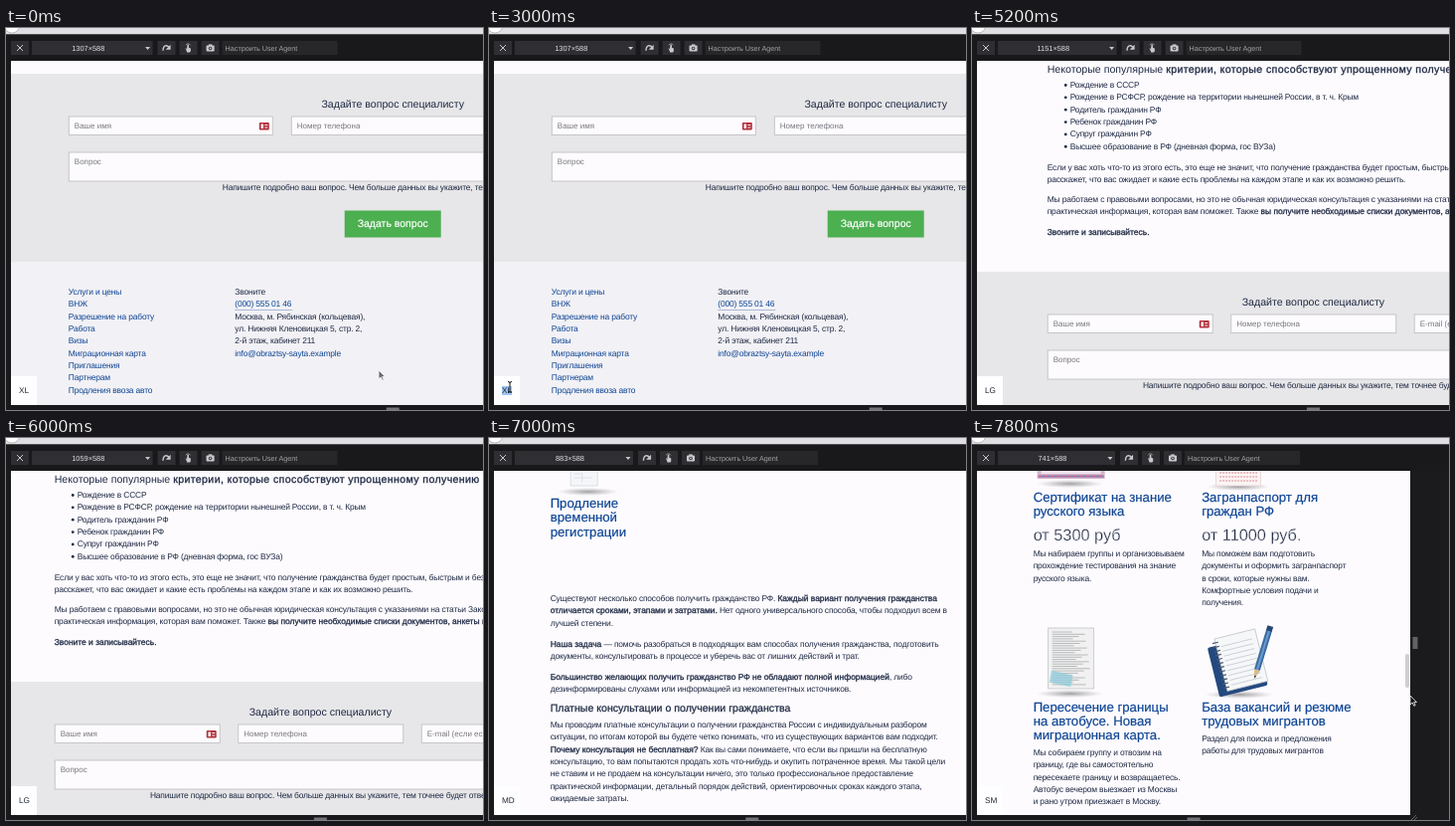
Animation, 480 px wide and 384 px high, one loop 8 s. Source, as an HTML page:

```html
<!DOCTYPE html>
<html lang="ru">
<head>
<meta charset="utf-8">
<title>Адаптивная страница</title>
<style>
  html, body { margin: 0; width: 100%; height: 100%; overflow: hidden; background: #18181b; }
  svg { display: block; width: 100vw; height: 100vh; }
  text { font-family: "Liberation Sans", Arial, sans-serif; text-rendering: geometricPrecision; white-space: pre; }
  .b { stroke: #1f2a44; stroke-width: .3px; letter-spacing: .035em; }
  .body { letter-spacing: -.02em; }
  .body .b { letter-spacing: 0; }
</style>
</head>
<body>
<svg id="stage" viewBox="0 0 480 384"></svg>
<script>
const LOOP = 8000, STEP = 200, SCALE = .587, LINE = 12.35, BODY = 8.45;
const INK = '#1f2a44', LINK = '#0e4594', PAGE = '#fdfbfe', DARK = '#19191c', HINT = '#77777d';

const rect = (x, y, w, h, fill, extra = '') =>
  `<rect x="${x}" y="${y}" width="${w}" height="${h}" fill="${fill}" ${extra}/>`;
const path = (d, stroke, width = 1, fill = 'none', extra = '') =>
  `<path d="${d}" stroke="${stroke}" stroke-width="${width}" fill="${fill}" ${extra}/>`;
const group = (x, y, content, extra = '') =>
  `<g transform="translate(${x} ${y}) ${extra}">${content}</g>`;
const shadow = (x, y, rx) =>
  `<ellipse cx="${x}" cy="${y}" rx="${rx}" ry="4" fill="url(#shade)"/>`;
const outline = (color, width) => `stroke="${color}" stroke-width="${width}"`;

// *Asterisks* mark emphasised words.
const text = (x, y, s, size = BODY, fill = INK, extra = '') =>
  `<text x="${x}" y="${y}" font-size="${size}" fill="${fill}" class="${size === BODY ? 'body' : ''}" ${extra}>${
    s.replace(/\*(.+?)\*/g, '<tspan class="b">$1</tspan>')}</text>`;
const lines = (x, y, rows, fill = INK) => rows.map((s, i) => text(x, y + i * LINE, s, BODY, fill)).join('');
const title = (x, y, rows) =>
  rows.map((s, i) => text(x, y + i * 14.3, s, 13.2, LINK, outline(LINK, .2))).join('');
// An outline in the page colour thins the strokes of the large prices.
const price = (x, y, s) => text(x, y, s, 16.3, INK, outline(PAGE, .3));

// Linear interpolation through [time, value] keys.
function track(keys, t) {
  if (t <= keys[0][0]) return keys[0][1];
  for (let i = 1; i < keys.length; i++) {
    const [t0, a] = keys[i - 1], [t1, b] = keys[i];
    if (t <= t1) return a + (b - a) * (t - t0) / (t1 - t0);
  }
  return keys[keys.length - 1][1];
}

const WIDTH = [[4000, 1307], [4400, 1304], [5200, 1151], [6000, 1059], [7000, 883], [7800, 741]];
const MOUSE_X = [[0, 375], [400, 330], [1000, 110], [1400, 21], [3200, 21], [3400, 60], [3600, 135]];
const MOUSE_Y = [[0, 344], [1000, 352], [1400, 361], [3200, 361], [3600, 352]];

const LAYOUTS = [
  { name: 'XL', min: 1200, container: 1140, draw: drawXL },
  { name: 'LG', min: 992, container: 940, draw: drawLG },
  { name: 'MD', min: 768, container: 720, draw: drawMD },
  { name: 'SM', min: 0, container: 578, draw: drawSM }
];

function field(x, y, w, h, label) {
  return rect(x + .5, y + .5, w - 1, h - 1, PAGE, 'stroke="#c6c5c9"') + text(x + 6, y + 12, label, 8, HINT);
}

function form(left, center, top, fieldWidth, pitch, height) {
  const labels = ['Ваше имя', 'Номер телефона', 'E-mail (если есть)'];
  const icon = left + fieldWidth - 14;
  return rect(0, top, 480, height, '#e7e6e8') +
    text(center, top + 33.5, 'Задайте вопрос специалисту', 10.6, INK, 'text-anchor="middle"') +
    labels.map((s, i) => field(left + i * pitch, top + 42.5, fieldWidth, 19.5, s)).join('') +
    rect(icon, top + 49, 10, 7.5, '#b3303d', 'rx="1"') +
    rect(icon + 1.8, top + 50.5, 2.4, 4.5, '#fff') +
    path(`M${icon + 5.5} ${top + 51.5}h3m-3 2.5h3`, '#fff', .9) +
    field(left, top + 78.5, 660, 30, 'Вопрос') +
    text(center - 171.5, top + 117, 'Напишите подробно ваш вопрос. Чем больше данных вы укажите, тем точнее будет ответ');
}

function drawXL(left, center) {
  const right = left + 167.5;
  return form(left, center, 46, 206, 224, 189) +
    rect(center - 48.5, 183.5, 97, 27, '#4caf50') +
    text(center, 200, 'Задать вопрос', 10.5, '#fff', 'text-anchor="middle" ' + outline('#fff', .2)) +
    rect(0, 235, 480, 145, '#f2f1f5') +
    lines(left, 268, ['Услуги и цены', 'ВНЖ', 'Разрешение на работу', 'Работа', 'Визы',
      'Миграционная карта', 'Приглашения', 'Партнерам', 'Продления ввоза авто'], LINK) +
    text(right, 268, 'Звоните') +
    text(right, 268 + LINE, '(000) 555 01 46', BODY, LINK) +
    path(`M${right} 283.5h58`, '#8ba3c8', .7) +
    lines(right, 268 + 2 * LINE, ['Москва, м. Рябинская (кольцевая),',
      'ул. Нижняя Кленовицкая 5, стр. 2,', '2-й этаж, кабинет 211']) +
    text(right, 268 + 5 * LINE, 'info@obraztsy-sayta.example', BODY, LINK);
}

function drawLG(left, center) {
  const criteria = ['Рождение в СССР', 'Рождение в РСФСР, рождение на территории нынешней России, в т. ч. Крым',
    'Родитель гражданин РФ', 'Ребенок гражданин РФ', 'Супруг гражданин РФ',
    'Высшее образование в РФ (дневная форма, гос ВУЗа)'];
  return text(left, 44.5, 'Некоторые популярные *критерии, которые способствуют упрощенному получению гражданства*', 10.6) +
    lines(left + 23, 60, criteria) +
    criteria.map((_, i) => `<circle cx="${left + 18.5}" cy="${57.5 + i * LINE}" r="1.4" fill="${INK}"/>`).join('') +
    lines(left, 142.5, [
      'Если у вас хоть что-то из этого есть, это еще не значит, что получение гражданства будет простым, быстрым и без проблем.',
      'расскажет, что вас ожидает и какие есть проблемы на каждом этапе и как их возможно решить.']) +
    lines(left, 174.5, [
      'Мы работаем с правовыми вопросами, но это не обычная юридическая консультация с указаниями на статьи Законов,',
      'практическая информация, которая вам поможет. Также *вы получите необходимые списки документов, анкеты и бланки*']) +
    text(left, 208, '*Звоните и записывайтесь.*') +
    form(left, center, 245, 167, 184.5, 135);
}

function drawMD(left) {
  return shadow(left + 38, 54, 31) +
    rect(left + 20.5, 25, 27, 23, '#f5f6f9', 'stroke="#dcdfe5"') +
    path(`M${left + 24} 36h9m-9 4h18m-10-4v8`, '#d3dae5', .8) +
    title(left, 70, ['Продление', 'временной', 'регистрации']) +
    lines(left, 164, ['Существуют несколько способов получить гражданство РФ. *Каждый вариант получения гражданства*',
      '*отличается сроками, этапами и затратами.* Нет одного универсального способа, чтобы подходил всем в',
      'лучшей степени.']) +
    lines(left, 209.5, ['*Наша задача* — помочь разобраться в подходящих вам способах получения гражданства, подготовить',
      'документы, консультировать в процессе и уберечь вас от лишних действий и трат.']) +
    lines(left, 242.5, ['*Большинство желающих получить гражданство РФ не обладают полной информацией*, либо',
      'дезинформированы слухами или информацией из некомпетентных источников.']) +
    text(left, 275, 'Платные консультации о получении гражданства', 10.6, INK, outline(INK, .25)) +
    lines(left, 291, ['Мы проводим платные консультации о получении гражданства России с индивидуальным разбором',
      'ситуации, по итогам которой вы будете четко понимать, что из существующих вариантов вам подходит.',
      '*Почему консультация не бесплатная?* Как вы сами понимаете, что если вы пришли на бесплатную',
      'консультацию, то вам попытаются продать хоть что-нибудь и окупить потраченное время. Мы такой цели',
      'не ставим и не продаем на консультации ничего, это только профессиональное предоставление',
      'практической информации, детальный порядок действий, ориентировочных сроках каждого этапа,',
      'ожидаемые затраты.']);
}

function notebook() {
  const rules = Array.from({ length: 9 }, (_, i) => `M13 ${9 + i * 5}h32`).join('');
  const rings = Array.from({ length: 12 }, (_, i) => `M5 ${4 + i * 4.2}h6`).join('');
  const pad = rect(-1, 7, 50, 51, '#23497f', 'rx="2"') +
    rect(8, 0, 42, 54, '#f6f7f8', outline('#b9c0ca', .7)) +
    path(rules, '#bfc4cd', .7) + path(rings, '#4a586d', 1.2);
  const pencil = rect(-3, 0, 6, 42, '#3a6ca5') + rect(-1, 0, 2, 42, '#6d9bca') +
    rect(-3, -4, 6, 5, '#27466f') + path('M-3 42h6l-3 9z', 'none', 0, '#d9b98a') + path('M-1 48h2l-1 3z', 'none', 0, '#333');
  return group(1, 14, pad, 'rotate(-14)') + group(64, 3, pencil, 'rotate(17)');
}

function drawSM(left) {
  const right = left + 169.5;
  const sheet = Array.from({ length: 24 }, (_, i) => `M4 ${4 + i * 2.3}h${20 + i * 13 % 19}`).join('');
  return shadow(left + 37, 46, 34) +
    rect(left + 4, 28, 68, 13, '#d9b3cb') + rect(left + 8, 28, 60, 8, '#f0e4ee') +
    path(`M${left + 5} 38.5h66`, '#7d7ab4', 2.2) +
    path(`M${left + 5} 38.5h66`, '#d66b85', 1.5, 'none', 'stroke-dasharray="3 3"') +
    shadow(right + 37, 49, 32) +
    rect(right + 14.5, 25, 45, 23, '#fbf4f4', outline('#dfcdcf', .7)) +
    path(`M${right + 18} 35h38m-38 4h38m-38 4h38`, '#d88b91', 1.2, 'none', 'stroke-dasharray="2 1"') +
    title(left, 63.8, ['Сертификат на знание', 'русского языка']) +
    title(right, 63.8, ['Загранпаспорт для', 'граждан РФ']) +
    price(left, 103, 'от 5300 руб') + price(right, 103, 'от 11000 руб.') +
    lines(left, 119, ['Мы набираем группы и организовываем', 'прохождение тестирования на знание', 'русского языка.']) +
    lines(right, 119, ['Мы поможем вам подготовить', 'документы и оформить загранпаспорт', 'в сроки, которые нужны вам.',
      'Комфортные условия подачи и', 'получения.']) +
    shadow(left + 37, 257, 34) +
    group(left + 15, 191, rect(0, 0, 46, 61, '#f1f1f1', outline('#c3c3c3', .8)) + path(sheet, '#a9abae', .8) +
      rect(2, 45, 22, 12, '#84c9dc', 'opacity=".65" transform="rotate(12 13 51)"')) +
    shadow(right + 38, 258, 35) + group(right + 4, 190, notebook()) +
    title(left, 274.5, ['Пересечение границы', 'на автобусе. Новая', 'миграционная карта.']) +
    title(right, 274.5, ['База вакансий и резюме', 'трудовых мигрантов']) +
    lines(left, 319, ['Мы собираем группу и отвозим на', 'границу, где вы самостоятельно', 'пересекаете границу и возвращаетесь.',
      'Автобус вечером выезжает из Москвы', 'и рано утром приезжает в Москву.']) +
    lines(right, 305, ['Раздел для поиска и предложения', 'работы для трудовых мигрантов']);
}

function toolbar(width) {
  const label = `${width}×588`;
  // The size menu fits its label, so narrow digits pull the buttons left.
  const shift = (width > 999 ? 1.6 : -2) - label.split('1').length + 1;
  const light = '#c9c9cc', box = '#2e2e33';
  const rotate = path('M-4 3C-4-3 0-4 3-.5', light, 1.5) + path('M4.500-3.500v5.500h-5.500z', 'none', 0, light);
  const touch = path('M-.5 3v-6.500', light, 1.8) + path('M-3.500 0l2 1.500V-1l4 1.500v3L1.500 5h-3z', 'none', 0, light) +
    path('M-3-3a2.700 2.700 0 0 1 5 0', light, .7);
  const camera = rect(-4.5, -2.7, 9, 6.5, light, 'rx="1"') + rect(-2, -4, 4, 2, light) +
    `<circle cy=".5" r="2" fill="${box}"/><circle cy=".5" r="1" fill="${light}"/>`;
  return rect(0, 0, 480, 6.5, '#dfdee2') +
    '<circle cx="6" cy="-3" r="8" fill="#fff" stroke="#aaa" stroke-width=".8"/>' +
    rect(0, 6.5, 480, 26.5, DARK) +
    rect(5, 13, 18, 14, box) + path('M11 17l6 6m0-6l-6 6', light, 1) +
    rect(26, 13, 121 + shift, 14, box) +
    text(82.5 + shift / 2, 22.9, label, 7.4, '#e2e2e4', 'text-anchor="middle"') +
    group(142 + shift, 19, path('M-2.500 0h5l-2.500 3z', 'none', 0, light)) +
    [rotate, touch, camera].map((icon, i) =>
      rect(152 + i * 22 + shift, 13, 18, 14, box) + group(161 + i * 22 + shift, 20, icon, 'scale(.9)')).join('') +
    rect(217 + shift, 13, 116, 14, '#27272a') +
    text(220 + shift, 22.7, 'Настроить User Agent', 7.2, '#a3a3a7');
}

function frameEdges(right, center) {
  const grip = right + 1;
  return rect(0, 33, 5, 351, DARK) + rect(0, 379, 480, 5, DARK) +
    rect(right - 5, 217, 4, 34, '#cfced1', 'rx="2"') +
    rect(right, 33, 480, 351, '#1b1b1e') +
    rect(right + 2.5, 200, 5, 12, '#626266') +
    rect(center - 6.5, 381.5, 13, 3, '#737377') +
    path(`M${grip} 384l5-5m-2 5l3-3`, '#77777b', .8);
}

function pointer(t, right) {
  const arrow = path('M0 0V9L2.200 7L3.800 10.300L5.200 9.600L3.700 6.600H6.500Z', '#fff', .8, '#111');
  const x = track(MOUSE_X, t), y = track(MOUSE_Y, t);
  if (t >= 7400) return group(right, 259, arrow);
  if (t >= 3800) return '';
  if (t >= 1400 && t <= 3200)
    return group(x, y, path('M-2-5.500Q0-5.500 0-4Q0-5.500 2-5.500M0-4V4M-2 5Q0 5 0 4Q0 5 2 5', '#111', 1));
  const moving = t < 1400 ? `<g opacity=".6">${arrow}</g>` : arrow;
  return group(x, y, moving);
}

function draw(t) {
  const width = Math.round(track(WIDTH, t));
  const layout = LAYOUTS.find(l => width >= l.min);
  const left = 5 + SCALE * ((width - layout.container) / 2 + 15);
  const center = 5.6 + SCALE * width / 2, right = 6 + SCALE * width;
  const selected = layout.name === 'XL' && t >= 2600;
  return '<defs><radialGradient id="shade"><stop stop-color="#77777a" stop-opacity=".7"/>' +
    '<stop offset="1" stop-color="#999" stop-opacity="0"/></radialGradient></defs>' +
    rect(0, 33, 480, 351, PAGE) + layout.draw(left, center) +
    rect(5, 350, 26, 29, '#fefdff') +
    (selected ? rect(13, 360, 10, 9, '#9cc3ee') : '') +
    text(13, 367, layout.name, 8.2, '#222a38') +
    frameEdges(right, center) + toolbar(width) + pointer(t, right);
}

const stage = document.getElementById('stage');
let shown = -1;
function tick() {
  const t = Math.floor(performance.now() % LOOP / STEP) * STEP;
  if (t !== shown) stage.innerHTML = draw(shown = t);
  requestAnimationFrame(tick);
}
tick();
</script>
</body>
</html>
```
